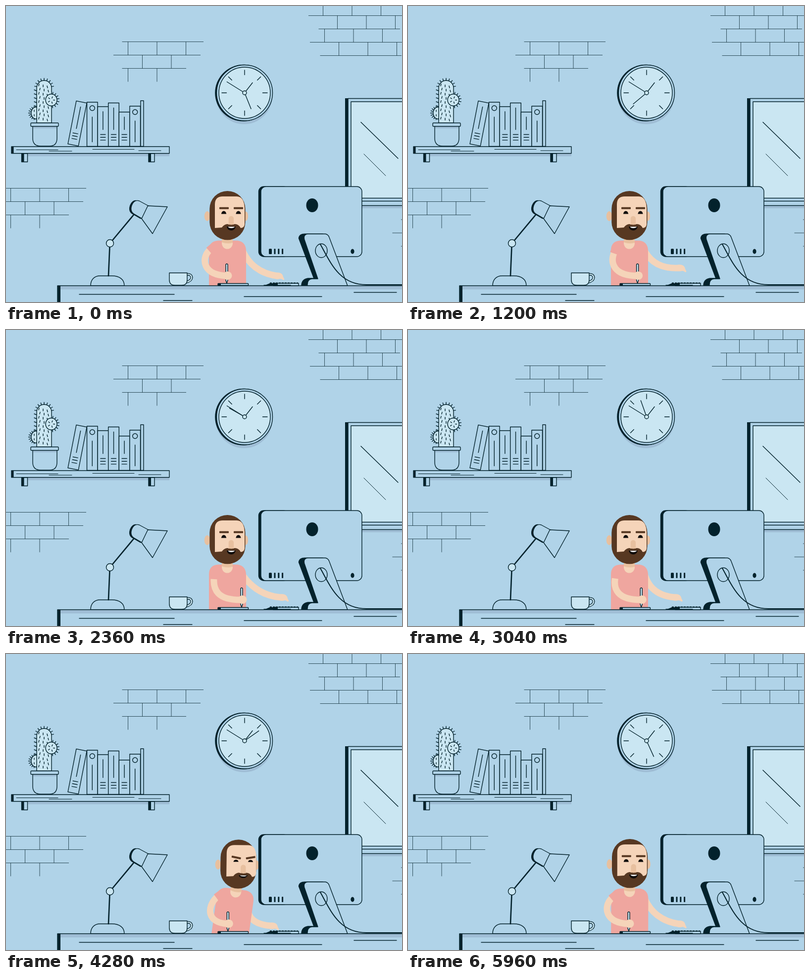
Animation of 800 by 600 pixels, one loop 6 s. Source, as an HTML page:

```html
<!DOCTYPE html>
<html lang="en">
<head>
<meta charset="utf-8">
<title>At the desk</title>
<style>
html, body { margin: 0; width: 100%; height: 100%; overflow: hidden; background: #b0d3e8; }
svg { display: block; width: 100%; height: 100%; }
.ink { stroke: #03222c; stroke-width: 1.4; fill: none; stroke-linejoin: round; stroke-linecap: round; }
.thin { stroke-width: .75; stroke-linecap: butt; }
.wall { fill: #b0d3e8; }
.glass { fill: #cae6f2; }
.dark { fill: #03222c; }
.shade { fill: #9fbdd5; }
.skin { fill: #f5d4b9; }
.blush { fill: #e8c09f; }
.hair { fill: #573822; }
.shirt { fill: #efa69f; }
.black { fill: #0e0b0a; }
.white { fill: #fff; }
.limb { fill: none; stroke: #f5d4b9; stroke-width: 13; stroke-linecap: round; }
.sleeve { fill: none; stroke: #efa69f; stroke-width: 16; }
</style>
</head>
<body>
<svg id="stage" viewBox="0 0 800 600" xmlns="http://www.w3.org/2000/svg"></svg>
<script>
const LOOP = 6000;
const path = (d, c = 'ink', more = '') => `<path class="${c}" d="${d}" ${more}/>`;
const rect = (x, y, w, h, c, r = 0) => `<rect class="${c}" x="${x}" y="${y}" width="${w}" height="${h}" rx="${r}"/>`;
const oval = (x, y, rx, ry, c) => `<ellipse class="${c}" cx="${x}" cy="${y}" rx="${rx}" ry="${ry}"/>`;
const group = (id, body, more = '') => `<g id="${id}" ${more}>${body}</g>`;
const repeat = (n, make) => Array.from({ length: n }, (_, i) => make(i)).join('');
// A ray from radius a to b, angle in degrees clockwise from the top.
const ray = (x, y, deg, a, b) => {
  const s = Math.sin(deg * Math.PI / 180), c = -Math.cos(deg * Math.PI / 180);
  return `M${x + a * s} ${y + a * c}L${x + b * s} ${y + b * c}`;
};
// n rays fanned evenly between two angles.
const fan = (x, y, from, to, n, a, b) => repeat(n, i => ray(x, y, from + (to - from) * i / (n - 1), a, b));

// Staggered courses; joints holds the number of upright joints in each.
function bricks(x0, y0, joints) {
  return path(joints.map((n, i) => {
    const odd = i % 2, x = x0 + odd * 29 + (i >> 1) * (joints.length > 3 ? 3 : 0), y = y0 + i * 27;
    return `M${x - (odd ? 58.5 : 12)} ${y}H${x + (n === 2 ? 117.5 : 152.5)}` + repeat(n, j => `M${x + j * 58.5} ${y}v27`);
  }).join(''), 'ink thin');
}

function clock() {
  return oval(481, 182.5, 57, 57, 'shade') + oval(479.7, 176.3, 57.5, 57.5, 'dark') +
    oval(482, 176, 56.5, 56.5, 'ink wall') + oval(482, 176, 52, 52, 'ink glass') +
    path(fan(482, 176, 0, 315, 8, 36.5, 46) + ray(482, 176, -58, 0, 42) + ray(482, 176, 38, 0, 26)) +
    path('M482 176V141', 'ink', 'id="second"') + oval(482, 176, 4, 4, 'ink glass');
}

function cactus() {
  const spines = fan(77, 166, -80, 80, 9, 15, 19.5) + repeat(5, i => `M62 ${172 + i * 8}l-5 -2`) +
    fan(91.5, 190.5, -10, 170, 9, 12, 16) + fan(59, 217, 190, 350, 9, 9.5, 13.5);
  const dots = repeat(27, i => `M${67 + i % 3 * 8 + (i / 3 & 1) * 2} ${158 + (i / 3 | 0) * 8.4 + i % 3 * 2}l${i % 3 - 1} 4`);
  return path(spines) + oval(60, 217, 9, 12, 'ink glass') +
    path('M62 237V166a15 15 0 0 1 30 0V237Z', 'ink glass') + path(dots) +
    oval(91.5, 190.5, 11.5, 12, 'ink glass') + path(fan(91.5, 190.5, 20, 308, 5, 4, 7) + fan(57, 217, 0, 180, 2, 3, 6)) +
    path('M54 244V268Q54 284 70 284H88Q103 284 103 268V244Z', 'ink wall') +
    rect(55, 244, 47, 4, 'shade') + rect(50, 237, 56, 7, 'ink wall', 1.5);
}

// A spine with a long line and either a ring on top or three short lines below.
function book(x, top, ringed, w = 21.6, bottom = 284.5) {
  const mid = x + w / 2;
  return rect(x, top, w, bottom - top, 'ink wall') + (ringed
    ? oval(mid, top + 12, 5, 5, 'ink') + path(`M${mid} ${top + 30}V${bottom - 9}`)
    : path(`M${mid} ${top + 10}V${bottom - 34}` + repeat(3, i => `M${mid - 5} ${bottom - 24 + i * 5.7}h10`)));
}

function shelf() {
  const leg = x => rect(x, 299, 12, 17, 'ink wall') + rect(x, 299, 5, 17, 'dark');
  return rect(44, 299, 286, 5.5, 'shade') + leg(31.5) + leg(288) +
    rect(11, 285, 319, 13.7, 'ink wall') + rect(11, 285, 4.5, 13.7, 'dark') +
    path('M21 291.5H105M87 294.2H133M175 290.5H259M268 293.2H313', 'ink', 'style="stroke-width:1"') + cactus() +
    group('tilted', book(0, 0, false, 21.6, 88.8), 'transform="translate(142 192.5) rotate(11)"') +
    [195, 204, 196.5, 215, 203].map((top, i) => book(163.5 + i * 21.6, top, i % 4 === 0)).join('') +
    rect(272, 192, 6, 92.5, 'ink wall');
}

function lamp() {
  const cap = 'M286.5 405L268 395Q258 392 253 404Q249 416 257 421L274 431Z';
  const base = 'M171 567C171 555 178 547 190 547H214C229 547 239 554 239 567Z';
  return path(base, 'ink wall') +
    path('M207 547L209.5 488M215 475L259 422', 'ink', 'style="stroke-width:2.6"') +
    oval(210, 481, 7.5, 7.5, 'ink glass') +
    path(cap, 'ink dark', 'transform="translate(-2 0)"') + path(cap, 'ink wall', 'transform="translate(1 0)"') +
    path('M286.5 405L326 407L296 461.5L274 431Z', 'ink wall');
}

function pictureFrame() {
  return rect(700, 404, 100, 6, 'shade') + rect(685, 187, 7, 218, 'dark') +
    rect(691, 187.5, 120, 217, 'ink wall') + rect(697, 194, 120, 195.5, 'ink glass') +
    path('M697 395.5H800M717 235.5L792 309') + path('M723 300L767 344', 'ink', 'style="stroke-width:1"');
}

function monitor() {
  return rect(510.5, 366, 60, 142, 'ink dark', 10) + rect(515, 366, 204, 142, 'ink wall', 10) +
    oval(618.5, 404, 12, 14, 'dark') + rect(531, 492, 6, 11, 'dark', 1.5) +
    repeat(3, i => rect(541.5 + i * 7.8, 492, 3, 11, 'dark', 1)) + oval(700, 497.5, 3.6, 5, 'dark') +
    path('M606 462Q592 461 591.5 471L622 552H610Q597 554 597 567H640V462Z', 'ink dark') +
    path('M610 462H645Q651 463 653 469L690 567H609Q608 554 618 553H630L603 474Q600 463 610 462Z', 'ink wall') +
    oval(637, 496, 12, 14, 'ink') +
    path('M635 483C655 518 672 565 728 565H800', 'ink', 'style="stroke-width:2"');
}

function desk() {
  const handle = style => path('M365 544Q375 543 375 551Q374 558 363 560', 'ink', `style="${style}"`);
  return rect(104, 567, 700, 40, 'ink wall') + rect(110, 568, 690, 6.5, 'shade') + rect(104, 567, 6, 40, 'dark') +
    path('M148 584.5H340M318 597H376M481 589H638M703 580.5H789') +
    handle('stroke-width:5') + handle('stroke-width:2.4;stroke:#cae6f2') +
    path('M330 541H366V555Q366 566 355 566H341Q330 566 330 555Z', 'ink glass') +
    rect(428, 562.5, 61.5, 4, 'ink wall', 1) + rect(428, 562.5, 6, 4, 'dark') +
    rect(540, 562, 51, 5, 'ink wall') + path('M521 567L533 562H549V567Z', 'dark') +
    path('M533 561.5H590', 'ink', 'style="stroke-width:2;stroke-dasharray:4 2;stroke-linecap:butt"') +
    path('M521 566H575');
}

function head() {
  const eye = x => path(`M${x - 5.2} 0Q${x - 4} -6 ${x} -6Q${x + 4} -6 ${x + 5.2} 0Z`, 'black');
  const brow = rect(-9.5, -2, 19, 4, 'hair', 1);
  return oval(406.5, 426, 5.8, 10, 'blush') + oval(484.5, 426, 4.5, 9.5, 'blush') +
    rect(411.3, 375, 72.2, 99.3, 'hair', 36) +
    path('M422 450V402Q422 386 438 386H466Q481 386 482 410V443Q481 450 474 450Q470 442 462 442L455 444L447 442Q440 443 436 449Z', 'skin', 'id="skin"') +
    group('face',
      path('M449.7 446V431a5.2 5.2 0 0 1 10.4 0V446Z', 'blush') +
      path('M442 449Q447 441 455 443.5Q464 441 469 449Z', 'hair') +
      group('mouth', path('M-9 0H9Q7 8 0 8Q-8 7.5 -9 0Z', 'black') + path('M-6.5 .5H7Q6 3.2 0 3.2Q-5.5 3 -6.5 .5Z', 'white')) +
      group('eyes', eye(440) + eye(469.5)) +
      path('M435.5 420Q440 418.5 445 420M465 420Q470 418.5 475 420', '', 'id="lids" fill="none" stroke="#3a2a22" stroke-width="1.2"') +
      group('browL', brow) + group('browR', brow));
}

function man() {
  return path('', 'limb', 'id="armR"') +
    group('handR', oval(2, 0, 10, 6.8, 'skin') + path('M4 -6Q12 -5 13 2L15.5 7Q14 10 11 7L5 5Z', 'skin')) +
    group('torso',
      path('M410 585V498Q409 477 428 475.5H468Q485 478 485 497V585Z', 'shirt') +
      path('M436 470H458V481a11 11.5 0 0 1 -22 0Z', 'skin') + path('M436 470H458V480Q447 483 436 479Z', 'blush')) +
    path('', 'limb', 'id="armL"') + path('', 'sleeve', 'id="sleeveL"') +
    group('head', head()) +
    group('pen', path('M-2 524Q0 521 2 524V556L0 562L-2 556Z', 'ink glass') + oval(1.5, 546.5, 9, 8.6, 'skin'));
}

stage.innerHTML = bricks(246.5, 72.5, [3, 2, 2]) + bricks(9.5, 369.5, [3, 2, 2]) + bricks(810, 433, [3, 2, 2]) +
  bricks(640.5, -7.5, [3, 3, 3, 3, 0]) +
  clock() + shelf() + pictureFrame() + lamp() + man() + monitor() + desk();

const ease = (t, a, b) => {
  const u = Math.min(1, Math.max(0, (t - a) / (b - a)));
  return u * u * (3 - 2 * u);
};
// Rises from 0 to 1 between a and b, falls back between c and d.
const pulse = (t, a, b, c, d) => ease(t, a, b) - ease(t, c, d);

const el = id => document.getElementById(id);
const move = (id, value) => el(id).setAttribute('transform', value);
const trace = (id, d) => el(id).setAttribute('d', d);

function draw(t) {
  const lean = pulse(t, 3780, 4150, 5720, 5990);
  const wow = pulse(t, 3380, 3600, 3700, 3950);
  const blink = pulse(t, 3480, 3600, 3690, 3820);
  const squint = pulse(t, 3690, 3820, 5900, 6000);

  move('second', `rotate(${158 + t * .06} 482 176)`);
  move('torso', `translate(${lean} 0) rotate(${7.8 * lean} 447 600)`);
  move('head', `translate(${22 * lean} ${1.3 * lean}) rotate(${.8 * lean} 447 425)`);
  move('skin', `translate(${1.5 * lean} 0)`);
  move('face', `translate(${2.5 * lean} 0)`);

  move('eyes', `translate(0 ${421.5 - 1.5 * lean}) scale(1 ${1 - blink - .3 * squint * (1 - blink)})`);
  el('lids').style.opacity = blink > .85 ? 1 : 0;
  move('mouth', `translate(${455 + wow} ${447 - wow}) scale(1 ${1 + .2 * wow - .3 * lean})`);
  const browY = 409.7 - 4 * wow + 1.5 * lean;
  move('browL', `translate(440.5 ${browY}) rotate(${11 * lean})`);
  move('browR', `translate(469.5 ${browY}) rotate(${-10 * lean})`);

  // Writing arm: the shoulder and elbow follow the pen across the tablet.
  const write = pulse(t, 0, 2150, 2500, 4650), pen = 446 + 30 * write;
  const sx = 410 + 10 * write + 14 * lean, sy = 496 + 9 * write - 3 * lean;
  trace('armL', `M${sx} ${sy}C${394 + 25 * write + 9 * lean} ${513 + 13 * write} ${398 + 29 * write + 6 * lean} ${545 + 3 * write} ${pen} 547`);
  trace('sleeveL', `M${421 + 15 * lean} ${486.5 - lean}L${sx} ${sy}`);
  move('pen', `translate(${pen} 0)`);

  // Typing arm: the hand lifts, reaches, draws back and reaches again.
  const x = 547 + 11 * pulse(t, 1300, 2050, 2150, 2900) - 11 * pulse(t, 2600, 3300, 4300, 4600) +
    12 * pulse(t, 4400, 5000, 5720, 5990);
  const y = 547 - 16 * pulse(t, 600, 1200, 1210, 1750) - 5 * pulse(t, 1900, 2400, 3400, 3800) + 4 * lean;
  trace('armR', `M${479 + 10 * lean} ${498 + 9 * lean}Q${x - 48 - 4 * lean} ${540 + (y - 547) * .4 + 6 * lean} ${x} ${y}`);
  move('handR', `translate(${x} ${y})`);
}

const start = performance.now();
function tick() {
  draw((performance.now() - start) % LOOP);
  requestAnimationFrame(tick);
}
tick();
</script>
</body>
</html>
```
